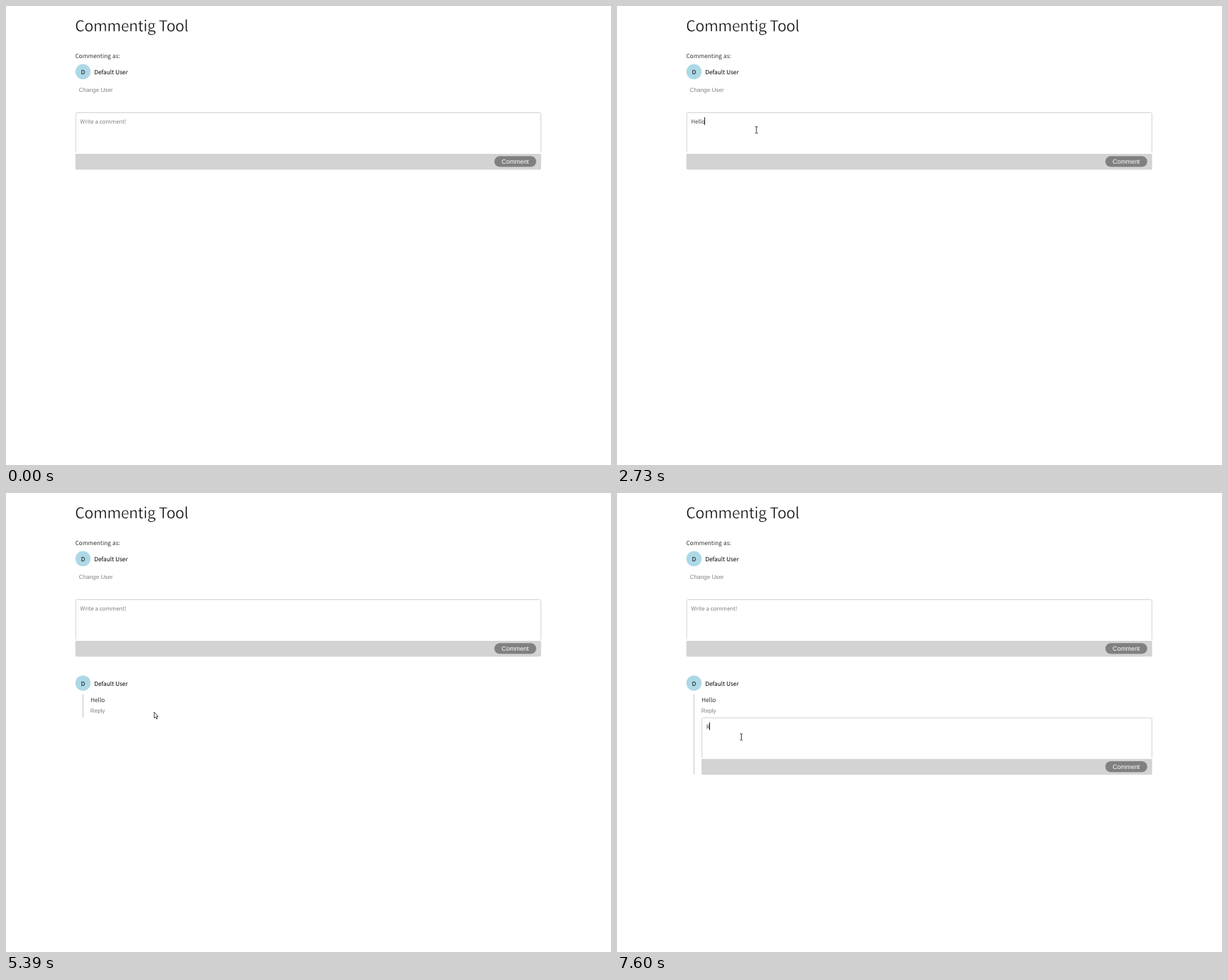
These frames come from a looping animation (859 px wide and 652 px high, 8000 ms). An HTML page:

```html
<!DOCTYPE html>
<html lang="en">
<head>
<meta charset="utf-8">
<title>Comment form</title>
<style>
  html, body { margin: 0; width: 100%; height: 100%; overflow: hidden; background: #fff; }
  svg { display: block; width: 859px; height: 652px; text-rendering: geometricPrecision; }
  text { font: 8.36px "Noto Sans CJK JP", "Noto Sans CJK SC", "Noto Sans CJK", sans-serif; fill: #000; white-space: pre; }
  .title { font-size: 21.5px; font-weight: 300; }
  .title.thin { letter-spacing: -.38px; stroke: #fff; stroke-width: .5px; }
  .soft { fill: #333; }
  .field { font-size: 7.96px; fill: #444; }
  .field.hint { fill: #808080; }
  .link { font: 8.17px "Liberation Sans", Arial, sans-serif; fill: #808080; }
  .button { font: 8.89px "Liberation Sans", Arial, sans-serif; fill: #fff; text-anchor: middle; }
  .initial { text-anchor: middle; }
</style>
</head>
<body>
<svg id="stage" viewBox="0 0 859 652">
  <text class="title" id="title" x="98" y="36.3">Commentig Tool</text>
  <text class="soft" x="98.3" y="74.3">Commenting as:</text>
  <text class="link" x="103.6" y="122.3">Change User</text>
</svg>
<script>
const LOOP = 8000;
const TICK = 800 / 12;
const stage = document.getElementById('stage');

function add(parent, tag, attrs, content) {
  const node = document.createElementNS('http://www.w3.org/2000/svg', tag);
  for (const key in attrs) node.setAttribute(key, attrs[key]);
  if (content) node.textContent = content;
  parent.appendChild(node);
  return node;
}
const show = (node, on) => node.setAttribute('visibility', on ? 'visible' : 'hidden');

function user(parent, y) {
  add(parent, 'circle', { cx: 109.3, cy: y, r: 10.8, fill: '#add8e6' });
  add(parent, 'text', { class: 'initial', x: 109.3, y: y + 3.8 }, 'D');
  add(parent, 'text', { x: 125.2, y: y + 3.8 }, 'Default User');
}

function form(parent, x, y) {
  const right = 759.5;
  add(parent, 'path', {
    d: `M${x + .5} ${y + 57}V${y + 2.5}q0-2 2-2H${right - 2}q2 0 2 2V${y + 57}`,
    fill: 'none', stroke: '#d3d3d3'
  });
  add(parent, 'path', {
    d: `M${x} ${y + 59}H${right + .3}v20.4q0 2-2 2H${x + 2}q-2 0-2-2z`, fill: '#d3d3d3'
  });
  add(parent, 'rect', { x: 693.4, y: y + 62.2, width: 59.4, height: 15.4, rx: 7.7, fill: '#808080' });
  add(parent, 'text', { class: 'button', x: 723.1, y: y + 72.8 }, 'Comment');
  const text = add(parent, 'text', { class: 'field hint', x: x + 6.7, y: y + 16 });
  const caret = add(parent, 'rect', { y: y + 7, width: 1, height: 11, fill: '#222' });
  return (value, caretOn) => {
    text.textContent = value || 'Write a comment!';
    text.setAttribute('class', value ? 'field' : 'field hint');
    const width = value ? text.getComputedTextLength() : 0;
    caret.setAttribute('x', Math.round(x + 6.4 + width));
    show(caret, caretOn);
  };
}

user(stage, 93.3);
const setMain = form(stage, 98.5, 151);

const posted = add(stage, 'g');
user(posted, 270);
const thread = add(posted, 'rect', { x: 108.8, y: 286, width: 1.2, fill: '#ccc' });
add(posted, 'text', { class: 'soft', x: 119.9, y: 296.5 }, 'Hello');
add(posted, 'text', { class: 'link', x: 119.8, y: 312 }, 'Reply');

const reply = add(stage, 'g');
const setReply = form(reply, 120, 318.8);

// Pointer shapes, each with its hot spot at 0,0
const pointer = add(stage, 'g');
const glow = add(pointer, 'circle', { r: 6.2, fill: '#ff0', 'fill-opacity': .62 });
const outline = { fill: '#fff', stroke: '#222', 'stroke-width': .8, 'stroke-linejoin': 'round' };
const shapes = {
  arrow: add(pointer, 'path', { ...outline, d: 'M.5 .6V9.4L2.5 7.6L3.8 10.6L5 10.1L3.7 7.1H6.1Z' }),
  hand: add(pointer, 'path', {
    ...outline,
    d: 'M-.9 7.2V.8Q-.9 0 0 0T.9 .8V4.2Q2 3.6 2.6 4.6Q3.7 4.1 4.1 5.1Q5.4 4.9 5.4 6V8.4' +
       'Q5.4 10 4.4 11.6H.2Q-.8 9.8-2.7 7.6Q-2.9 6.3-1.8 6.4Z'
  }),
  beam: add(pointer, 'path', {
    d: 'M-1.9-4.5H-.6L0-4L.6-4.5H1.9M0-4V4M-1.9 4.5H-.6L0 4L.6 4.5H1.9',
    fill: 'none', stroke: '#222', 'stroke-width': .9
  })
};

const linear = p => p;
const smooth = p => p * p * (3 - 2 * p);
const out = k => p => 1 - (1 - p) ** k;

// time, x, y, easing for x, easing for y
const track = [
  [120, 703, 590],
  [920, 200, 182, out(3.08), out(1.47)],
  [990, 198, 176],
  [3200, 198, 176],
  [3790, 723.4, 224.6, smooth, smooth],
  [4190, 723.4, 224.6],
  [4860, 417, 306],
  [5720, 138, 312, out(1.4), out(1.4)],
  [5790, 135, 310.5],
  [6190, 135, 310.5],
  [6530, 176.5, 346.5, smooth, smooth]
];
const typing = [[1920, 'H'], [2190, 'He'], [2390, 'Hel'], [2530, 'Hell'], [2730, 'Hello'], [4190, '']];
const mainCaret = [[1060, 1590], [1920, 3260], [3790, 4060]];
const replyCaret = [[6590, 7130], [7600, 8000]];
const clicks = [[990, 1120], [4060, 4120], [6060, 6190], [6590, 6720]];

const within = (spans, t) => spans.some(([a, b]) => t >= a && t < b);
const inside = (x, y, l, t, r, b) => x >= l && x <= r && y >= t && y <= b;

function place(t) {
  const i = track.findIndex(key => key[0] > t);
  if (i < 0) return track[track.length - 1].slice(1, 3);
  const [t0, x0, y0] = track[i - 1];
  const [t1, x1, y1, ex = linear, ey = linear] = track[i];
  const p = Math.floor((t - t0 + 4) / TICK) * TICK / (t1 - t0);
  const q = Math.min(1, p);
  return [x0 + (x1 - x0) * ex(q), y0 + (y1 - y0) * ey(q)];
}

function shapeAt(x, y, hasPost, hasReply) {
  if (inside(x, y, 693, 213, 753, 229)) return 'hand';
  if (hasPost && inside(x, y, 119, 303, 141, 311.8)) return 'hand';
  if (inside(x, y, 98, 151, 760, 209)) return 'beam';
  if (hasReply && inside(x, y, 120, 319, 760, 377)) return 'beam';
  return 'arrow';
}

function draw(t) {
  const hasPost = t >= 4190, hasReply = t >= 6190;
  const typed = typing.filter(step => step[0] <= t).pop();
  setMain(typed ? typed[1] : '', within(mainCaret, t));
  setReply(t >= 7600 ? 'R' : '', within(replyCaret, t));
  posted.style.display = hasPost ? '' : 'none';
  reply.style.display = hasReply ? '' : 'none';
  thread.setAttribute('height', hasReply ? 114 : 33);

  pointer.style.display = t < 120 ? 'none' : '';
  if (t < 120) return;
  const [x, y] = place(t);
  pointer.setAttribute('transform', `translate(${x} ${y})`);
  const current = shapeAt(x, y, hasPost, hasReply);
  for (const name in shapes) show(shapes[name], name === current);
  show(glow, within(clicks, t));
}

// Thin the heading when no light weight is available
const title = document.getElementById('title');
const lightWidth = title.getComputedTextLength();
title.style.fontWeight = 400;
const plainWidth = title.getComputedTextLength();
title.style.fontWeight = '';
if (Math.abs(lightWidth - plainWidth) < .5) title.classList.add('thin');

const start = performance.now();
function frame() {
  draw((performance.now() - start) % LOOP);
  requestAnimationFrame(frame);
}
frame();
</script>
</body>
</html>
```
